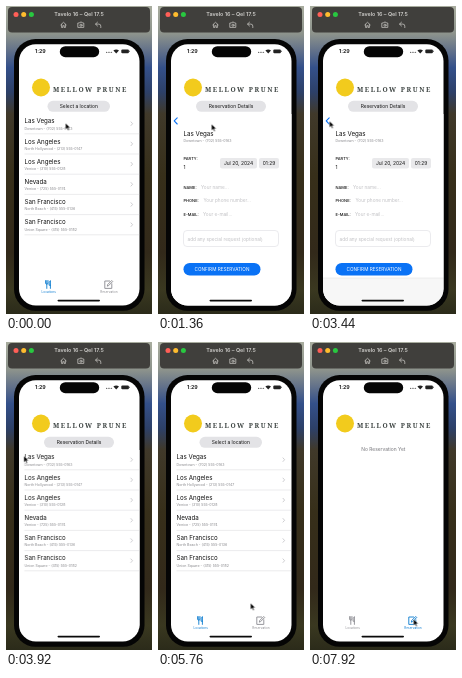
These frames come from a looping animation (146 px wide and 308 px high, 8000 ms). An HTML page:

```html
<!DOCTYPE html>
<html lang="en">
<head>
<meta charset="utf-8">
<title>Reservation app</title>
<style>
html, body { margin: 0; width: 100%; height: 100%; overflow: hidden; background: #2b2a28; }
svg { display: block; width: 100vw; height: 100vh; }
text { font-family: Inter, Roboto, sans-serif; fill: #111; }
.mid { text-anchor: middle; }
.big { font-size: 6.2px; }
.body { font-size: 4.9px; }
.sub { font-size: 3.6px; fill: #8a8a8e; }
.label { font-size: 4px; font-weight: 500; }
.hint { font-size: 4.7px; fill: #c0c0c4; }
.tab { font-size: 3.1px; fill: currentColor; }
.brand { font: 700 6.6px "Noto Serif", "Liberation Serif", serif; letter-spacing: 1.55px; fill: #3f4644; }
.line { fill: none; stroke-linecap: round; stroke-linejoin: round; }
.icon { stroke: currentColor; stroke-width: .9; }
.on { color: #0a7bd0; }
.off { color: #8c8c91; }

.list, .detail, .back, .press, .cursor, .show { animation: 8s infinite; }
.list { animation-name: list; }
.detail { animation-name: detail; }
.back { animation-name: back; }
.press { animation-name: press; }
.cursor { animation-name: cursor; }
.show { animation-timing-function: step-end; }
.picking { animation-name: picking; }
.booking { animation-name: booking; }
.tabs { animation-name: tabs; }
.first { animation-name: first; }
.second { animation-name: second; }
.strip { animation-name: strip; }

@keyframes list {
  0%, 8% { transform: none; animation-timing-function: cubic-bezier(.2,.8,.2,1); }
  14.25%, 43.5% { transform: translateX(-36px); animation-timing-function: cubic-bezier(.2,.8,.2,1); }
  50.25%, 100% { transform: none; }
}
@keyframes detail {
  0%, 8% { transform: translateX(121px); animation-timing-function: cubic-bezier(.2,.8,.2,1); }
  14.25%, 43.5% { transform: none; animation-timing-function: cubic-bezier(.2,.8,.2,1); }
  50.25%, 100% { transform: translateX(121px); }
}
@keyframes back {
  0%, 9% { opacity: 0; }
  13%, 43.5% { opacity: 1; }
  47%, 100% { opacity: 0; }
}
@keyframes press {
  0%, 6.5% { opacity: 0; }
  7%, 8.5% { opacity: 1; }
  13%, 100% { opacity: 0; }
}
@keyframes cursor {
  0%, 9% { transform: translate(59.5px,117px); animation-timing-function: ease-in-out; }
  16%, 19% { transform: translate(53.5px,118px); animation-timing-function: ease-in-out; }
  31%, 42% { transform: translate(19.5px,115px); animation-timing-function: ease-in-out; }
  48%, 52% { transform: translate(17.8px,113.8px); animation-timing-function: ease-in-out; }
  69%, 73% { transform: translate(92.5px,261px); animation-timing-function: ease-in-out; }
  81%, 100% { transform: translate(103.5px,277px); }
}
@keyframes picking { 0% { opacity: 1; } 8.5% { opacity: 0; } 50.5% { opacity: 1; } 83%, 100% { opacity: 0; } }
@keyframes booking { 0% { opacity: 0; } 8.5% { opacity: 1; } 50.5%, 100% { opacity: 0; } }
@keyframes tabs { 0% { opacity: 1; } 8% { opacity: 0; } 50.5%, 100% { opacity: 1; } }
@keyframes first { 0% { opacity: 1; } 83%, 100% { opacity: 0; } }
@keyframes second { 0% { opacity: 0; } 83%, 100% { opacity: 1; } }
@keyframes strip { 0% { opacity: 0; } 29% { opacity: 1; } 43.5%, 100% { opacity: 0; } }
</style>
</head>
<body>
<svg viewBox="0 0 146 308" preserveAspectRatio="none">
  <defs>
    <linearGradient id="land" x2="0" y2="1">
      <stop offset="0" stop-color="#a9ad9f"/>
      <stop offset=".09" stop-color="#8d938c"/>
      <stop offset=".14" stop-color="#66748a"/>
      <stop offset=".2" stop-color="#34508a"/>
      <stop offset=".28" stop-color="#2d4068"/>
      <stop offset=".35" stop-color="#40392a"/>
      <stop offset=".55" stop-color="#372f1a"/>
      <stop offset=".8" stop-color="#32291a"/>
      <stop offset=".92" stop-color="#3a3820"/>
      <stop offset="1" stop-color="#2b2b1a"/>
    </linearGradient>
    <clipPath id="screen"><rect x="13" y="38.3" width="120.5" height="261.2" rx="16.8"/></clipPath>
    <clipPath id="page"><rect x="13" y="108" width="120.5" height="192"/></clipPath>
    <g id="fork">
      <path class="line icon" d="M39.6 274.6v2.4q0 1.2 1.2 1.2t1.2-1.2v-2.4M40.8 274.6v7.8M44.4 282.4v-7.8q-1.6 1.4-1.4 4.6h1.4"/>
      <text class="tab mid" x="42.7" y="287">Locations</text>
    </g>
    <g id="note">
      <path class="line icon" d="M103.6 275h-4.8v7.4h7v-4.6M101.4 279.8l.3-1.3 4-4 1 1-4 4z"/>
      <text class="tab mid" x="103" y="287">Reservation</text>
    </g>
  </defs>

  <rect width="146" height="308" fill="url(#land)"/>

  <!-- simulator window bar -->
  <rect x="2" y="1" width="142" height="25.5" rx="4" fill="#403f3c"/>
  <circle cx="10" cy="8.5" r="2.5" fill="#ff5f57"/>
  <circle cx="17.7" cy="8.5" r="2.5" fill="#febc2e"/>
  <circle cx="25.4" cy="8.5" r="2.5" fill="#28c840"/>
  <text class="mid" x="73" y="10.3" style="font-size:5.4px;font-weight:600;fill:#cfcecb">Tavelo 16 – Qel 17.5</text>
  <g class="line" stroke="#c2c0bd" stroke-width=".8">
    <path d="M54.8 18.8l2.7-2.5 2.7 2.5M55.6 18.5v3h1.2v-1.8h1.4v1.8h1.2v-3"/>
    <path d="M72.2 17h1.2l.6-.8h2l.6.8h1.2v4.4h-5.6z"/>
    <circle cx="75" cy="19.2" r="1.1"/>
    <path d="M91.5 16.2l-2 1.9 2 1.9M89.7 18.1h3.1q2 0 2 2v1.5"/>
  </g>

  <!-- phone -->
  <rect x="8" y="33" width="130.5" height="271.8" rx="21.5" fill="#050505"/>
  <g clip-path="url(#screen)">
    <rect x="13" y="38" width="121" height="262" fill="#fff"/>

    <g clip-path="url(#page)">
      <g class="show first">
        <g class="list" id="list">
          <rect class="press" x="13" y="109" width="121" height="18.8" fill="#dcdce0"/>
        </g>
        <g class="detail">
          <rect x="13" y="108" width="121" height="192" fill="#fff"/>
          <text class="big" x="25.5" y="130">Las Vegas</text>
          <text class="sub" x="25.5" y="135.5">Downtown  -  (702) 555-0163</text>
          <text class="label" x="25.5" y="154">PARTY:</text>
          <text class="body" x="25.5" y="163">1</text>
          <rect x="62" y="152" width="37" height="10.5" rx="2" fill="#e9e9eb"/>
          <text class="mid body" x="80.5" y="159">Jul 20, 2024</text>
          <rect x="101" y="152" width="20" height="10.5" rx="2" fill="#e9e9eb"/>
          <text class="mid body" x="111" y="159">01:29</text>
          <g id="form"></g>
          <rect x="25.5" y="224.5" width="95" height="16" rx="3.5" fill="none" stroke="#dedee2" stroke-width=".6"/>
          <text class="hint" x="29.5" y="234.5">add any special request (optional)</text>
          <g class="show strip">
            <rect x="13" y="272" width="121" height="28" fill="#f7f7f7"/>
            <path d="M13 272h121" stroke="#d4d4d6" stroke-width=".4"/>
          </g>
          <rect x="25.5" y="257" width="77" height="12.5" rx="6.2" fill="#0a72f5"/>
          <text class="mid" x="64" y="265.1" style="font-size:4.7px;fill:#fff">CONFIRM RESERVATION</text>
        </g>
        <path class="line back" d="M19.2 111.8l-3 3.1 3 3.1" stroke="#0a72f5" stroke-width="1.1"/>
      </g>
    </g>

    <!-- status bar -->
    <text x="29" y="47.3" style="font-size:5.4px;font-weight:600">1:29</text>
    <rect x="53.8" y="40.2" width="39.4" height="11" rx="5.5" fill="#050505"/>
    <g fill="#222">
      <circle cx="100.5" cy="46.3" r=".5"/><circle cx="102.2" cy="46.3" r=".5"/>
      <circle cx="103.9" cy="46.3" r=".5"/><circle cx="105.6" cy="46.3" r=".5"/>
      <path d="M110.2 47.5l-2.8-3q2.8-2.2 5.6 0z"/>
      <rect x="115.3" y="43.4" width="7.6" height="3.9" rx="1.1"/>
      <rect x="123.3" y="44.7" width=".6" height="1.3"/>
    </g>

    <!-- brand header -->
    <circle cx="35" cy="81.5" r="9" fill="#f2cb1d"/>
    <text class="brand" x="47" y="85.5">MELLOW PRUNE</text>

    <g class="show picking">
      <rect x="41.5" y="94.8" width="62.5" height="11" rx="5.5" fill="#e3e3e6"/>
      <text class="mid body" x="72.8" y="102.1">Select a location</text>
    </g>
    <g class="show booking">
      <rect x="38" y="94.8" width="70" height="11" rx="5.5" fill="#e3e3e6"/>
      <text class="mid body" x="73" y="102.1">Reservation Details</text>
    </g>
    <text class="show second mid" x="73.3" y="108.7" style="font-size:4.9px;fill:#75757a">No Reservation Yet</text>

    <g class="show tabs">
      <g class="show first">
        <use href="#fork" class="on"/>
        <use href="#note" class="off"/>
      </g>
      <g class="show second">
        <use href="#fork" class="off"/>
        <use href="#note" class="on"/>
      </g>
    </g>
    <rect x="51.5" y="293.8" width="42.5" height="1.6" rx=".8" fill="#0a0a0a"/>
  </g>

  <path class="cursor" d="M0 0v6.6l1.6-1.4 1.1 2.4 1.1-.5-1.1-2.3h2.1z" fill="#000" stroke="#fff" stroke-width=".5"/>
</svg>

<script>
const places = [
  ["Las Vegas", "Downtown  -  (702) 555-0163"],
  ["Los Angeles", "North Hollywood  -  (213) 555-0147"],
  ["Los Angeles", "Venice  -  (310) 555-0128"],
  ["Nevada", "Venice  -  (725) 555-0174"],
  ["San Francisco", "North Beach  -  (415) 555-0136"],
  ["San Francisco", "Union Square  -  (415) 555-0182"]
];
const fields = [
  ["NAME:", 43, "Your name..."],
  ["PHONE:", 45.5, "Your phone number..."],
  ["E-MAIL:", 45, "Your e-mail..."]
];
const add = (id, html) => document.getElementById(id).insertAdjacentHTML("beforeend", html);
const text = (cls, x, y, s) => `<text class="${cls}" x="${x}" y="${y}">${s}</text>`;

places.forEach(([city, info], i) => {
  const y = 117.4 + i * 20.2;
  add("list", text("big", 18.5, y, city) + text("sub", 18.5, y + 6.1, info) +
    `<path class="line" d="M125 ${y - 1.5}l1.6 1.8-1.6 1.8" stroke="#b9b9be" stroke-width=".7"/>
     <path d="M18.5 ${y + 10.4}H133.5" stroke="#d2d2d6" stroke-width=".45"/>`);
});
fields.forEach(([name, x, hint], i) => {
  const y = 183 + i * 13.3;
  add("form", text("label", 25.5, y, name) + text("hint", x, y, hint));
});
</script>
</body>
</html>
```
